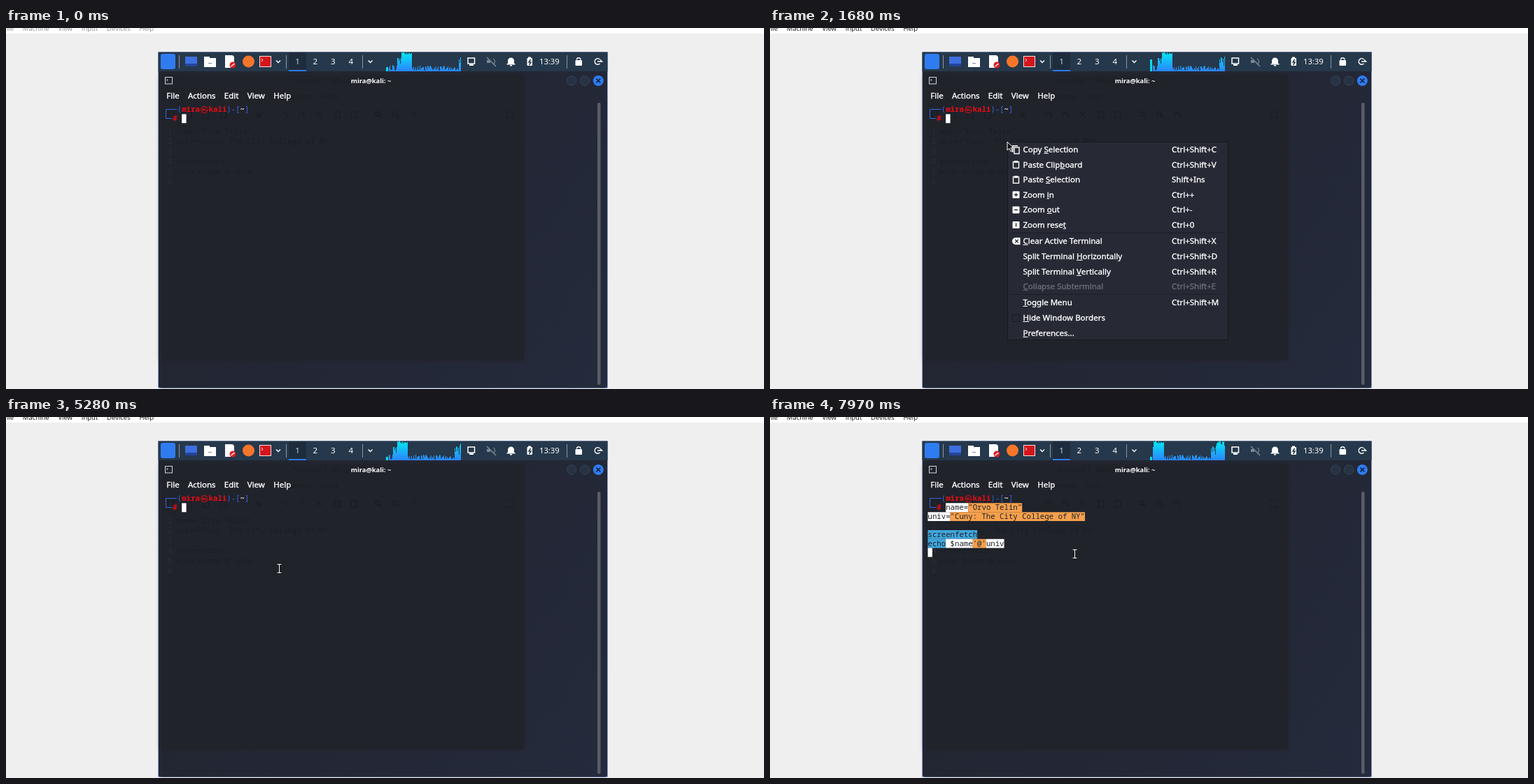
Write an HTML page with a canvas that moves like this. It is 1083 by 517 pixels and loops after 8000 ms.

```html
<!DOCTYPE html>
<html lang="en">
<head>
<meta charset="utf-8">
<title>Terminal paste</title>
<style>
html, body { margin: 0; width: 100%; height: 100%; overflow: hidden; background: #efefef; }
canvas { display: block; }
</style>
</head>
<body>
<canvas id="stage" width="1083" height="517"></canvas>
<script>
const g = document.getElementById('stage').getContext('2d');
const SANS = '"Noto Sans", "Open Sans", sans-serif';
const UI = '11.5px ' + SANS;
const TITLE = 'bold 9.3px ' + SANS;
const MONO = '10.69px "Noto Sans Mono", "DejaVu Sans Mono", monospace';
const LOOP = 8000, CELL = 6.414, ROW = 12.85, LEFT = 225.5, TOP = 110.5;
const PASTE = 6670, MENU_OPEN = 1680, MENU_CLOSE = 5280;
const RED = '#ec0a12', BLUE = '#3367e0', ACCENT = '#2f7cf0', INK = '#1f2229';
const ORANGE = '#f6a04d', SKY = '#41a6dc', PANEL = '#26384b', GHOST = '#1b1d24';

function box(x, y, w, h, color, r = 0) {
  g.fillStyle = color;
  g.beginPath();
  g.roundRect(x, y, w, h, r);
  g.fill();
}
function frame(x, y, w, h, color, width = 1) {
  g.strokeStyle = color;
  g.lineWidth = width;
  g.strokeRect(x, y, w, h);
}
function disc(x, y, r, color) {
  g.fillStyle = color;
  g.beginPath();
  g.arc(x, y, r, 0, 7);
  g.fill();
}
function arc(x, y, r, color, width = 1.5, from = 0, to = 2 * Math.PI) {
  g.strokeStyle = color;
  g.lineWidth = width;
  g.beginPath();
  g.arc(x, y, r, from, to);
  g.stroke();
}
function line(color, width, ...points) {
  g.strokeStyle = color;
  g.lineWidth = width;
  g.beginPath();
  points.forEach((v, i) => i % 2 && g.lineTo(points[i - 1], v));
  g.stroke();
}
function cross(x, y, r, color, width = 1.5) {
  line(color, width, x - r, y - r, x + r, y + r);
  line(color, width, x + r, y - r, x - r, y + r);
}
function chevron(x, y) {
  line('#fff', 1.4, x - 3, y - 1.5, x, y + 1.5, x + 3, y - 1.5);
}
function text(s, x, y, color = '#fff', font = UI, align = 'left') {
  g.font = font;
  g.fillStyle = color;
  g.textAlign = align;
  g.fillText(s, x, y);
}
// Interface text is slightly heavier than the regular weight
function label(s, x, y, color = '#fff') {
  text(s, x, y, color);
  g.strokeStyle = color;
  g.lineWidth = .35;
  g.strokeText(s, x, y);
}
function spread(words, x, y, gap, write) {
  for (const word of words.split(' ')) {
    write(word, x, y);
    x += g.measureText(word).width + gap;
  }
}
function term(s, col, row, color, back, bold) {
  const x = LEFT + col * CELL, y = TOP + row * ROW;
  if (back) box(x, y, s.length * CELL, ROW, back);
  text(s, x, y + 9.9, color, (bold ? 'bold ' : '') + MONO);
}

// Processor graph: scrolls while the terminal is live, stands still behind the menu
const noise = i => { const v = Math.sin(i * 91.7 + 3) * 4375.5; return v - Math.floor(v); };
const pulse = (t, start, end) =>
  t > start && t < end ? Math.sqrt(Math.sin(Math.PI * (t - start) / (end - start))) : 0;
function load(i) {
  const n = noise(i);
  if (i > 106) return 21 + n * 7;
  if (i > 99) return 8 + n * 14;
  if (i > 17 && i < 33) return 24 + n * 4;
  if (i > 10 && i < 18) return 8 + n * 12;
  return n > .95 ? 26 : 1 + n * 8;
}
function graph(t) {
  const shade = g.createLinearGradient(0, 35, 0, 62);
  shade.addColorStop(0, '#04e8f4');
  shade.addColorStop(1, '#2b83ff');
  const now = 5 + 21 * (pulse(t, 0, 1880) + pulse(t, PASTE, 7760));
  const shift = Math.floor(t < PASTE ? Math.min(t, 1880) / 310 : 13 + (t - PASTE) / 310);
  box(543, 62 - now, 3, now, '#08dcec');
  for (let x = 0; x < 103; x++) {
    const h = Math.round(load(x + shift));
    box(547 + x, 62 - h, 1, h, shade);
  }
}

function panel(t) {
  box(217.5, 34.5, 642, 27.5, PANEL);
  for (const x of [247, 400, 509, 801]) box(x, 39, 1, 19, '#8b97a3');
  box(221, 37, 21, 22, ACCENT, 3);

  box(256, 41, 17, 14, '#3d6fe0');
  box(256, 51, 17, 4, '#24459c');
  box(283, 41, 8, 4, '#fff');
  box(283, 43, 17, 13, '#fff');
  box(289, 50, 5, 1, '#7d8a9c');
  box(313, 39, 13, 18, '#fff', [0, 4, 0, 0]);
  disc(324, 53, 4.5, '#dd1c22');
  line('#fff', 1.5, 321.5, 55, 326.5, 51);
  disc(346.5, 48, 8.5, '#f4762b');
  box(362, 40, 17, 16, '#d5141b');
  frame(362.5, 40.5, 16, 15, '#f4dede');
  line('#fff', 1, 365, 44, 367, 46, 365, 48);
  chevron(389, 48);
  chevron(520.5, 48);

  box(404, 35, 25, 27, '#1e2c3d');
  box(404, 60, 25, 2, ACCENT);
  for (let i = 0; i < 4; i++) text(i + 1, 416.5 + i * 25.4, 52, i ? '#fff' : '#a9dcf5', UI, 'center');
  graph(t);

  frame(660, 43, 9.5, 8, '#fff', 1.5);
  box(662, 52, 6, 2, '#fff');
  box(687, 46, 5, 4, '#7d8995');
  arc(694, 48, 4.5, '#7d8995', 1.3, -1.1, 1.1);
  line('#7d8995', 1.4, 687, 42, 700, 55);
  box(717, 42.5, 9, 9.5, '#fff', [5, 5, 0, 0]);
  box(715.5, 51, 12, 1.5, '#fff');
  box(720, 53, 3, 1.5, '#fff');
  box(744.5, 43, 7.5, 11, '#fff', 1);
  box(746, 41.5, 4, 2, '#fff');
  line(PANEL, 1.5, 749.5, 45, 747, 49, 750, 49, 747.5, 53);
  text('13:39', 762, 52, '#fff', '11.2px ' + SANS);
  box(813.5, 46, 9.5, 8, '#fff', 1);
  arc(818.2, 45.5, 2.8, '#fff', 1.4, Math.PI, 0);
  arc(845.5, 48, 4.3, '#fff', 1.5, .8, 5.5);
  line('#fff', 1.4, 845, 48, 851.5, 48, 849, 45.5);
}

// Editor window shining through the terminal
function ghost() {
  text('*Untitled 1 - Mousepad', 410, 79, GHOST, '9.3px ' + SANS);
  spread('Document Help', 381, 102, 12.3, (s, x, y) => text(s, x, y, GHOST));
  for (let i = 0; i < 4; i++) frame(232 + i * 25, 120, 8, 9, GHOST, 1.5);
  cross(361, 125, 3, GHOST, 2);
  for (const x of [398, 422, 582]) arc(x, 125, 4, GHOST, 1.5, Math.PI, 7);
  cross(447, 124, 4, GHOST);
  for (const x of [473, 497]) frame(x - 4, 120, 8, 9, GHOST, 1.5);
  for (const x of [531, 556]) {
    arc(x, 123, 3.3, GHOST);
    line(GHOST, 2, x + 2.5, 125.5, x + 6, 129);
  }
  g.setLineDash([5, 5]);
  g.lineDashOffset = 2.5;
  frame(715, 119.5, 10, 10, GHOST, 1.5);
  g.setLineDash([]);
  ['name="Orvo Telin"', 'univ="Cuny: The City College of NY"', '', 'screenfetch', "echo $name'@'univ", '']
    .forEach((s, i) => {
      const y = 152 + i * 14.4;
      text(i + 1, 231, y, '#2c2f38', MONO);
      text(s, 242, y, GHOST, MONO);
    });
}

function terminal(t) {
  box(217.5, 34.5, 642, 481, '#2b4fa0');
  const shade = g.createLinearGradient(218, 62, 859, 515);
  shade.addColorStop(0, '#22252f');
  shade.addColorStop(.6, '#232736');
  shade.addColorStop(1, '#242b3c');
  box(218, 62, 641, 453.5, shade, [0, 0, 4, 4]);
  g.shadowColor = '#20222a';
  g.shadowBlur = 8;
  box(223, 67, 517, 409, '#21232b');
  g.shadowBlur = 0;
  ghost();

  frame(227.5, 70.5, 10, 9.5, '#d5d8de');
  line('#fff', 1, 229.5, 73, 231, 74.5, 229.5, 76);
  text('mira@kali: ~', 521.5, 79, '#fff', TITLE, 'center');
  for (const x of [808, 827]) {
    disc(x, 75.5, 7, '#273344');
    arc(x, 75.5, 6.7, '#364252', 1);
  }
  disc(846.3, 75.5, 7.5, ACCENT);
  cross(846.3, 75.5, 3, '#10203c', 1.6);
  spread('File Actions Edit View Help', 229.3, 101, 12.3, label);
  box(845, 107, 4.5, 404, '#5a5d68', 2);

  line(BLUE, 1, 244.5, 116.5, 228.5, 116.5, 228.5, 129.5, 238, 129.5);
  term('(', 3, 0, BLUE);
  term('mira', 4, 0, RED, null, true);
  text('㉿', LEFT + 9 * CELL, TOP + 10, RED, 'bold 10.7px "Noto Sans CJK KR", "Noto Sans CJK JP", sans-serif', 'center');
  term('kali', 10, 0, RED, null, true);
  term(')-[', 14, 0, BLUE);
  term('~', 17, 0, '#fff', null, true);
  term(']', 18, 0, BLUE);
  term('#', 2, 1, RED, null, true);

  const pasted = t >= PASTE;
  if (pasted) {
    term('name=', 4, 1, INK, '#fff');
    term('"Orvo Telin"', 9, 1, INK, ORANGE);
    term('univ=', 0, 2, INK, '#fff');
    term('"Cuny: The City College of NY"', 5, 2, INK, ORANGE);
    term('screenfetch', 0, 4, INK, SKY);
    term('echo', 0, 5, INK, SKY);
    term(' $name', 4, 5, INK, '#fff');
    term("'@'", 10, 5, INK, ORANGE);
    term('univ', 13, 5, INK, '#fff');
  }
  term(' ', pasted ? 0 : 4, pasted ? 6 : 1, INK, '#fff');
}

// Underscore marks the mnemonic letter
const MENU = [
  ['Copy _Selection', 'Ctrl+Shift+C'], ['Paste Clip_board', 'Ctrl+Shift+V'],
  ['Paste _Selection', 'Shift+Ins'], ['Zoom _in', 'Ctrl++'],
  ['Zoom _out', 'Ctrl+-'], ['Zoom rese_t', 'Ctrl+0'],
  ['_Clear Active Terminal', 'Ctrl+Shift+X'], ['Split Terminal _Horizontally', 'Ctrl+Shift+D'],
  ['Split Terminal _Vertically', 'Ctrl+Shift+R'], ['_Collapse Subterminal', 'Ctrl+Shift+E'],
  ['_Toggle Menu', 'Ctrl+Shift+M'], ['_Hide Window Borders', ''], ['_Preferences...', '']
];
const rowY = i => 174 + i * 21.6 + 1.7 * ((i > 5) + (i > 9));
function menu(t) {
  const back = '#272a35';
  box(340, 163, 315, 284, back);
  frame(339.5, 163.5, 315, 283, '#161920');
  for (const i of [6, 10]) box(345, Math.round(rowY(i) - 12), 305, 1, '#1b1e26');
  if (t >= 4290) box(341, rowY(2) - 10.5, 313, 21.5, ACCENT);
  MENU.forEach(([name, keys], i) => {
    const color = i === 9 ? '#6b6e76' : '#fff', x = 361.5, y = Math.round(rowY(i) + 4);
    const [head, tail] = name.split('_');
    label(head + tail, x, y, color);
    box(x + g.measureText(head).width, y + 1, g.measureText(tail[0]).width, 1, color);
    label(keys, 574, y, color);
  });
  frame(349, 171, 7, 9, '#fff', 1.4);
  line('#fff', 1.4, 346.8, 178, 346.8, 168.8, 354, 168.8);
  for (const i of [1, 2]) {
    frame(347.5, rowY(i) - 4, 8, 9, '#fff', 1.4);
    box(349, rowY(i) - 5.5, 5, 3, '#fff');
  }
  for (const i of [3, 4, 5]) {
    const y = rowY(i);
    box(346.5, y - 5, 10, 10, '#fff', 1);
    if (i < 5) box(349, y - .7, 5, 1.5, back);
    if (i !== 4) box(350.8, y - 2.5, 1.5, 5, back);
  }
  box(346, rowY(6) - 5, 11.5, 10, '#fff', [5, 0, 0, 5]);
  cross(352.5, rowY(6), 2.3, back, 1.3);
  frame(346.5, 410.5, 10, 10, '#171a20');
}

// Pointer travel: start, end, x, y
const MOVES = [[190, 890, 339, 163], [2210, 2410, 387, 210], [2680, 2890, 390, 217],
  [PASTE, 7020, 432, 172.5], [7760, 7970, 435, 195.5]];
function pointer(t) {
  if (t < 190) return;
  let x = 720, y = 363;
  for (const [start, end, toX, toY] of MOVES) {
    if (t < start) break;
    const stepped = Math.floor((t - start) / 70 + .15) * 70;
    const p = t >= end ? 1 : Math.min(1, stepped / (end - start));
    const k = 1 - (1 - p) ** 2;
    x += (toX - x) * k;
    y += (toY - y) * k;
  }
  g.save();
  g.translate(Math.round(x), Math.round(y));
  if (t >= 1480 && t < 4020) {
    const arrow = new Path2D('M0 0V12L3 9.5 5 14 7 13 5 8.8 8.7 8.5Z');
    g.fillStyle = '#111';
    g.fill(arrow);
    g.strokeStyle = '#fff';
    g.lineWidth = 1;
    g.stroke(arrow);
  } else {
    for (const [color, width] of [['#000', 3], ['#fff', 1.2]]) {
      line(color, width, .5, -6, .5, 6);
      for (const end of [-6, 6]) line(color, width, -2.5, end, 3.5, end);
    }
  }
  g.restore();
}

function draw() {
  const t = performance.now() % LOOP;
  box(0, 0, 1083, 517, '#efefef');
  box(0, 0, 1083, 8, '#fff');
  spread('File Machine View Input Devices Help', -4, 4, 12.8, (s, x, y) =>
    text(s, x, y, t < 1150 ? '#8c8c8c' : '#111', '9.5px "Open Sans", sans-serif'));
  terminal(t);
  panel(t);
  if (t >= MENU_OPEN && t < MENU_CLOSE) menu(t);
  pointer(t);
  requestAnimationFrame(draw);
}
draw();
</script>
</body>
</html>
```
